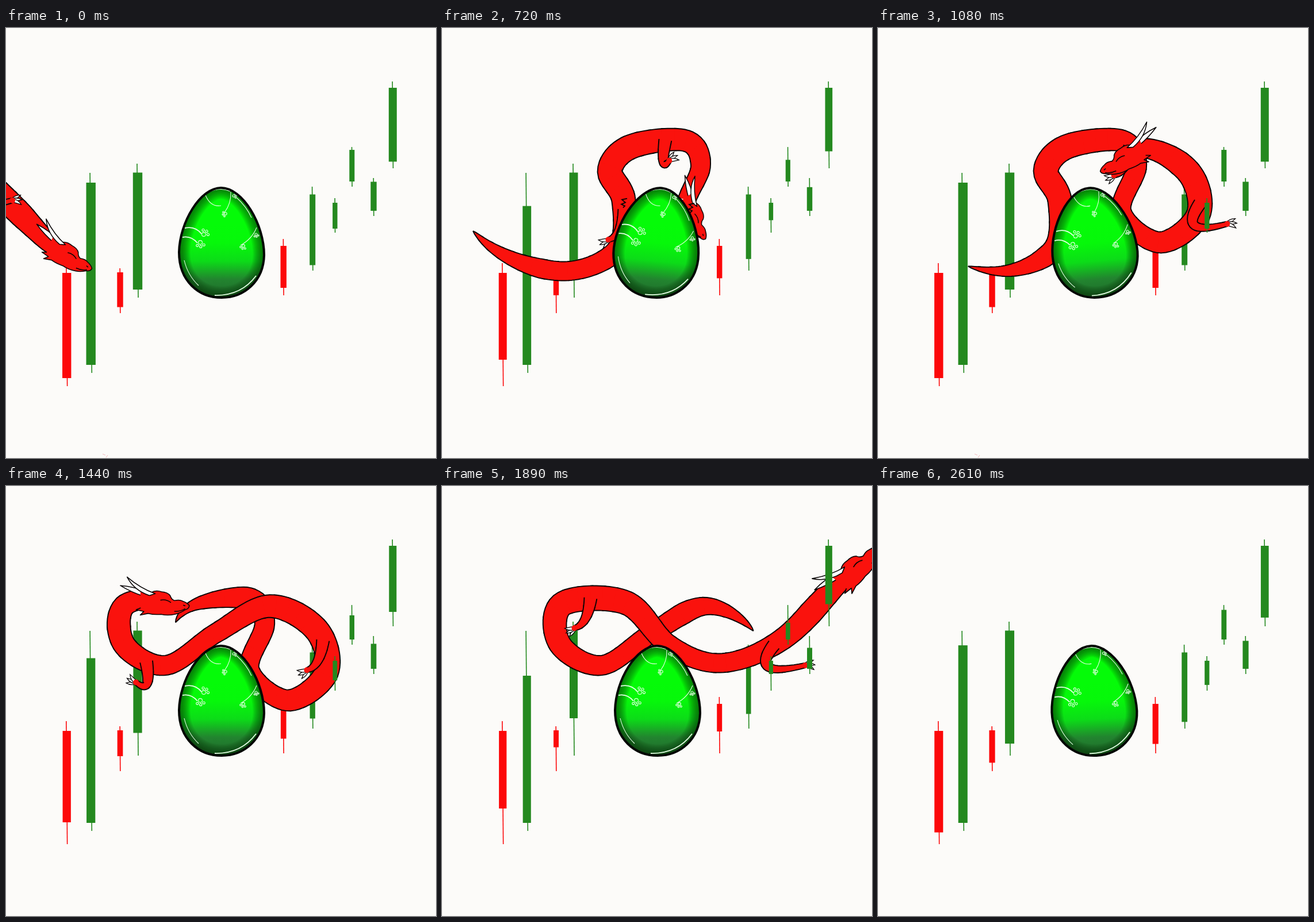
Recreate the animation shown at these times as an HTML page with a canvas. Size 748x748 px, loop 2700 ms.

```html
<!DOCTYPE html>
<html lang="en">
<head>
<meta charset="utf-8">
<title>Dragon and egg</title>
<style>
html, body { margin: 0; width: 100%; height: 100%; overflow: hidden; background: #fcfbf9; }
canvas { display: block; width: 100vw; height: 100vh; }
</style>
</head>
<body>
<canvas id="stage" width="748" height="748"></canvas>
<script>
const ctx = document.getElementById('stage').getContext('2d');
const STEP = 90, COUNT = 30, GAP = 4;
const INK = '#080404', SKIN = '#fa120d', GREEN = '#24891f', RED = '#fc080a';

// x, width, top, bottom, wick top, wick bottom, shrink (negative: from the top)
const candles = [
  [105.7, 15.4, 426, 609, 409, 623, 48],
  [147.7, 16.4, 269, 586, 252, 600, -61],
  [198.5, 10.4, 425, 485.5, 418, 496, 31],
  [229, 16.4, 251.5, 455, 236, 469, 51],
  [482.7, 10.4, 379, 452, 367, 465, 25],
  [533.2, 10, 289.5, 412.5, 276, 422, 16],
  [572.3, 8.4, 304, 349, 296, 356, 22],
  [601.8, 9, 212, 267, 207, 276, -26],
  [639.5, 10.4, 267.5, 318, 261, 327, -14],
  [672.8, 14, 104, 232.5, 93, 244, 27]
];

// key points of the flight
const route = [
  [-290, 15], [-5, 294], [100, 390], [215, 423], [305, 385], [316, 300], [292, 247], [330, 206],
  [424, 196], [450, 240], [424, 320], [490, 373], [557, 325], [540, 250], [458, 209], [365, 256],
  [278, 312], [205, 275], [210, 205], [320, 203], [395, 277], [485, 308], [590, 268], [690, 168],
  [850, 0], [1100, -260]
];

function spline(u) {
  const i = Math.min(route.length - 2, Math.floor(u)), t = u - i;
  const [a, b, c, d] = [-1, 0, 1, 2].map(k => route[Math.max(0, Math.min(route.length - 1, i + k))]);
  return [0, 1].map(k => b[k] + 0.5 * t * (c[k] - a[k] + t * (2 * a[k] - 5 * b[k] + 4 * c[k] - d[k]
    + t * (3 * (b[k] - c[k]) + d[k] - a[k]))));
}

// evenly spaced points, so that places can be given as distances
const line = [route[0]];
let lead = 0;
for (let u = 0; u < route.length - 1; u += 0.004) {
  const p = spline(u), q = line[line.length - 1];
  if (Math.hypot(p[0] - q[0], p[1] - q[1]) >= GAP) line.push(p);
  if (u < 1) lead = line.length - 1;
}

function spot(d) {
  const u = Math.max(0, Math.min(line.length - 1.001, lead + d / GAP));
  const i = Math.floor(u), t = u - i;
  return line[i].map((v, k) => v + (line[i + 1][k] - v) * t);
}

function draw(d, fill) {
  const p = new Path2D(d);
  if (fill) { ctx.fillStyle = fill; ctx.fill(p); }
  ctx.stroke(p);
}

// painted from back to front so that the ribbon can cross itself
function ribbon(pts, half) {
  const sides = pts.map((p, i) => {
    const a = pts[Math.max(0, i - 1)], b = pts[Math.min(pts.length - 1, i + 1)];
    const dx = b[0] - a[0], dy = b[1] - a[1], k = half(i) / (Math.hypot(dx, dy) || 1);
    return [[p[0] + dy * k, p[1] - dx * k], [p[0] - dy * k, p[1] + dx * k]];
  });
  ctx.fillStyle = SKIN;
  ctx.strokeStyle = INK;
  ctx.lineWidth = 1.9;
  for (let i = 0; i < sides.length - 1; i += 4) {
    const part = sides.slice(Math.max(0, i - 1), i + 5);
    const left = part.map(s => s[0]), right = part.map(s => s[1]);
    ctx.beginPath();
    left.concat(right.slice().reverse()).forEach(q => ctx.lineTo(...q));
    ctx.fill();
    for (const edge of [left, right]) {
      ctx.beginPath();
      edge.forEach(q => ctx.lineTo(...q));
      ctx.stroke();
    }
  }
}

function limb(d, ex, ey, hx, hy) {
  const [x, y] = spot(d), pts = [];
  for (let i = 0; i <= 20; i++) {
    const t = i / 20, bend = 2.6 * t * (1 - t);
    pts.push([x + bend * ex + t * t * hx, y + bend * ey + t * t * hy]);
  }
  ribbon(pts, i => 11 - 0.34 * i);
  ctx.save();
  ctx.translate(x + hx, y + hy);
  ctx.rotate(Math.atan2(hy - ey, hx - ex) - 0.5);
  ctx.lineWidth = 1.3;
  for (let i = 0; i < 3; i++) {
    draw('M-2 -3 Q10 -5 17 1 Q8 2 -2 3Z', '#fff');
    ctx.rotate(0.5);
  }
  ctx.beginPath();
  ctx.arc(0, 0, 5, 0, 7);
  ctx.fillStyle = SKIN;
  ctx.fill();
  ctx.restore();
}

function head(x, y, angle, size) {
  ctx.save();
  ctx.translate(x, y);
  ctx.rotate(angle);
  ctx.scale(size, Math.cos(angle) < 0 ? -size : size);
  ctx.strokeStyle = INK;
  ctx.lineJoin = 'round';
  ctx.lineWidth = 1.6;
  draw('M4 -13 Q-18 -21 -43 -21 Q-22 -10 0 -5Z', '#fff');
  draw('M-7 -17 Q4 -16 12 -12 Q20 -18 31 -15 Q42 -15 47 -9 Q49 -3 55 -1 Q64 -4 70 -1 ' +
    'Q78 1 82 6 Q82 12 75 14 Q66 21 58 23 Q45 27 33 25 Q20 27 10 25 L-4 29 L2 22 L-12 20 L-4 16', SKIN);
  draw('M20 -11 Q-6 -18 -32 -37 Q-18 -14 10 -7Z', '#fff');
  draw('M30 0 Q40 -3 49 3 M56 18 Q67 18 75 12 M71 6 L75 7');
  ctx.restore();
}

function dragon(n) {
  const front = 115 + n * (73 + 0.8 * n);
  const gap = Math.max(0, 16 - n, n - 23);
  const length = Math.max(500, 990 - 5 * gap * gap);
  const [x, y] = spot(front), [ax, ay] = spot(front + 75);
  const size = Math.hypot(ax - x, ay - y) / 80;

  const count = Math.ceil(length / 5), pts = [];
  for (let i = 0; i <= count; i++) pts.push(spot(front - length * (1 - i / count)));
  ribbon(pts, i => {
    const run = length * i / count, neck = Math.min(1, (length - run) / 70);
    const girth = 19 + 2.5 * Math.cos((front - length + run) * Math.PI / 250);
    return (girth * neck + 17 * size * (1 - neck)) * Math.min(1, run / 130) ** 0.75;
  });

  const swing = Math.cos((n - 11) * Math.PI / 5);
  limb(front - length / 2, -4, 36, -28, 52);
  limb(front - 150, -14 - 22 * swing, 46, 18 + 36 * swing, 36);
  head(x, y, Math.atan2(ay - y, ax - x), size);
}

function candle([x, width, top, bottom, high, low, shrink], i, full) {
  const cut = shrink * (1 - full), lean = (bottom - top) / 200;
  const w = width * (0.86 + 0.14 * full);
  ctx.strokeStyle = ctx.fillStyle = i < 5 && i % 2 === 0 ? RED : GREEN;
  ctx.lineWidth = 1.6;
  ctx.beginPath();
  ctx.moveTo(x - lean, high);
  ctx.lineTo(x + lean, low);
  ctx.stroke();
  ctx.fillRect(x - w / 2, top - Math.min(0, cut), w, bottom - top - Math.abs(cut));
}

const shell = new Path2D('M374 278 C412 278 449 342 449 395 C448 440 415 469 375 469 ' +
  'C335 469 301 440 301 390 C302 338 338 278 374 278Z');
const glow = ctx.createLinearGradient(0, 278, 0, 469);
['#06f609', '#05fb08', '#05fb08', '#06f80a', '#0cdc18', '#22842f', '#1f6a2b']
  .forEach((c, i) => glow.addColorStop(i / 6, c));

// a round pad with a fan of three toes
function paw(x, y, r, turn) {
  const ring = (cx, cy, cr) => {
    ctx.beginPath();
    ctx.arc(cx, cy, cr, 0, 7);
    ctx.stroke();
  };
  ring(x, y, r);
  for (let i = 0; i < 3; i++) {
    const a = turn + i * 0.87;
    ring(x + 2.2 * r * Math.cos(a), y + 2.2 * r * Math.sin(a), r * 0.6);
  }
}

function egg(angle) {
  ctx.save();
  ctx.translate(375 - angle * 0.2, 376);
  ctx.rotate(angle * Math.PI / 180);
  ctx.translate(-375, -376);
  ctx.fillStyle = glow;
  ctx.fill(shell);
  ctx.save();
  ctx.clip(shell);
  ctx.strokeStyle = 'rgba(0,50,8,.07)';
  for (let w = 6; w <= 40; w += 3) {
    ctx.lineWidth = w;
    ctx.stroke(shell);
  }
  ctx.restore();
  ctx.strokeStyle = '#e4ffe4';
  ctx.lineWidth = 1.1;
  draw('M347 291 Q356 312 374 309 M391 285 Q392 305 380 321 M436 347 Q428 367 408 378 ' +
    'M401 295 Q418 310 427 330 M310 404 Q316 430 335 448 M352 286 Q372 276 390 284');
  paw(344, 359, 3.4, -1.7);
  paw(338, 373, 3.4, 0.6);
  paw(382, 323, 2.2, 2);
  paw(413, 379, 2.4, 1);
  paw(435, 359, 2, 0.5);
  paw(396, 292, 2, -1);
  ctx.lineWidth = 1.8;
  draw('M311 348 Q329 344 340 358 M307 364 Q322 361 333 374 M363 465 Q409 466 435 431');
  ctx.strokeStyle = '#030603';
  ctx.lineWidth = 4;
  ctx.stroke(shell);
  ctx.restore();
}

function shakeMark(x, y) {
  ctx.save();
  ctx.strokeStyle = INK;
  ctx.lineWidth = 1.8;
  ctx.translate(x, y);
  draw('M6 -8 L-3 -6 L3 -1 L-4 2 L2 5 L-1 8');
  ctx.restore();
}

// the egg sways twice while the dragon brushes it, then gets one hard push
function rock(n) {
  if (n > 6 && n < 14) return (6.9 - 0.15 * n) * Math.sin((n - 6) * Math.PI / 4);
  return n > 22 ? -13.5 * Math.sin((n - 22) * Math.PI / 7.5) : 0;
}

function paint(n) {
  const beat = n % 6, tilt = rock(n);
  const full = beat < 3 ? 1 - beat / 3 : Math.sin((beat - 3) * Math.PI / 6);
  ctx.fillStyle = '#fcfbf9';
  ctx.fillRect(0, 0, 748, 748);
  candles.forEach((c, i) => i < 6 && candle(c, i, full));
  dragon(n);
  egg(tilt);
  candles.forEach((c, i) => i >= 6 && candle(c, i, full));
  if (Math.abs(tilt) > 5.5) {
    shakeMark(312 + tilt * 0.7, 308 - tilt * 0.6);
    shakeMark(433, 313);
  }
  if (beat === 0) {
    ctx.strokeStyle = '#f4b9bd';
    ctx.lineWidth = 1;
    draw('M168 741 L173 743 M174 747 L177 743');
  }
}

let shown = -1;
function tick() {
  const n = Math.floor(performance.now() / STEP) % COUNT;
  if (n !== shown) paint(shown = n);
  requestAnimationFrame(tick);
}
tick();
</script>
</body>
</html>
```
